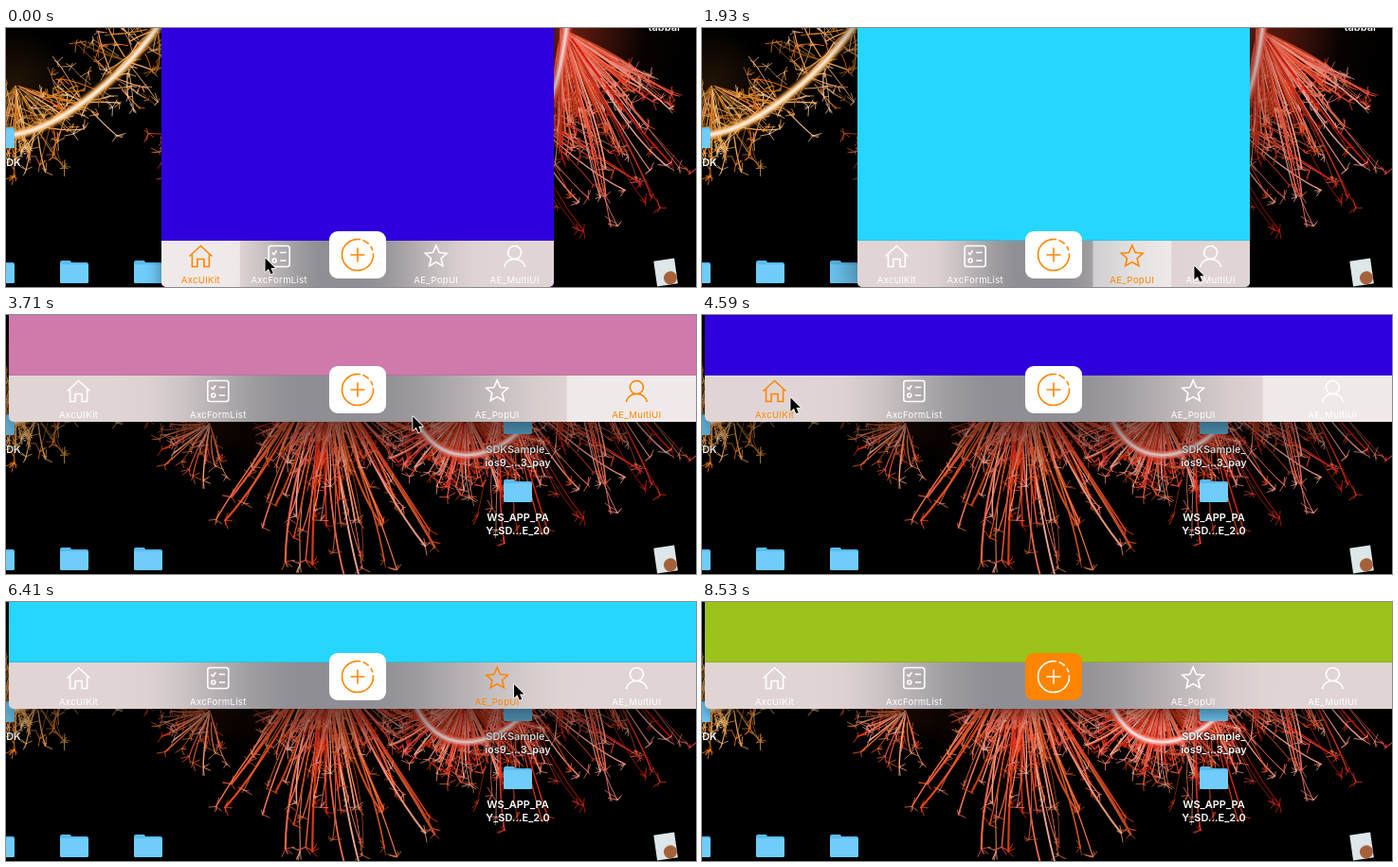
These frames come from a looping animation (728 px wide and 274 px high, 8.63 s). An HTML page with a canvas:

```html
<!DOCTYPE html>
<html lang="en">
<head>
<meta charset="utf-8">
<title>Tab bar demo</title>
<style>
html, body { margin: 0; width: 100%; height: 100%; overflow: hidden; background: #000; }
canvas { display: block; }
</style>
</head>
<body>
<canvas id="stage" width="728" height="274"></canvas>
<script>
const W = 728, H = 274, LOOP = 8630, TAU = Math.PI * 2;
const ORANGE = '#ff8500', WHITE = '#fff', GOLD = 29, CORAL = 8;
const stage = document.getElementById('stage').getContext('2d');

const TABS = [
  { label: 'AxcUIKit', page: '#2f00dd', icon: home },
  { label: 'AxcFormList', page: '#404633', icon: list },
  { label: '', page: '#9bc31b', icon: plus },
  { label: 'AE_PopUI', page: '#26d6ff', icon: star },
  { label: 'AE_MultiUI', page: '#ce7bac', icon: person }
];
// The pointer is at x, y when the tab is chosen, then leaves for the next stop
const STOPS = [
  { at: 0, tab: 0, x: 273, y: 243 },
  { at: 350, tab: 1, x: 275, y: 245 },
  { at: 1060, tab: 2, x: 383, y: 250 },
  { at: 1700, tab: 3, x: 456, y: 253 },
  { at: 2280, tab: 4, x: 530, y: 251 },
  { at: 3110, tab: 4, x: 500, y: 250 },
  { at: 3710, tab: 4, x: 430, y: 107 },
  { at: 4590, tab: 0, x: 92, y: 87 },
  { at: 5060, tab: 1, x: 235, y: 88 },
  { at: 5830, tab: 2, x: 425, y: 102 },
  { at: 6330, tab: 3, x: 505, y: 88 },
  { at: 7120, tab: 4, x: 610, y: 83 },
  { at: 7710, tab: 2, x: 385, y: 84 },
  { at: LOOP, tab: 0, x: 400, y: 290 }
];

const mix = (a, b, p) => a + (b - a) * p;
const progress = (t, start, end) => Math.min(1, Math.max(0, (t - start) / (end - start)));
function ease(t, start, end) {
  const p = progress(t, start, end);
  return p * p * (3 - 2 * p);
}

// ---- desktop ----
let seed = 7;
function random() {
  seed = (seed * 16807) % 2147483647;
  return seed / 2147483647;
}
const range = (a, b) => mix(a, b, random());

function line(g, points, close) {
  g.beginPath();
  points.forEach(([x, y]) => g.lineTo(x, y));
  if (close) g.closePath();
  g.stroke();
}

// Sparks around a direction (degrees), each ending in a small star
function burst(g, x, y, count, direction, spread, reach, hue, width = 1) {
  const halo = g.createRadialGradient(x, y, 0, x, y, reach * .6);
  halo.addColorStop(0, `hsl(${hue} 70% 45% / ${count / 250})`);
  halo.addColorStop(1, `hsl(${hue} 70% 45% / 0)`);
  g.fillStyle = halo;
  g.fillRect(0, 0, W, H);
  for (let i = 0; i < count; i++) {
    const a = (direction + range(-spread, spread)) * Math.PI / 180;
    const r = reach * range(.3, 1), bend = range(-.08, .08) * r;
    const c = Math.cos(a), s = Math.sin(a), from = r * range(0, .4);
    const ex = x + c * r, ey = y + s * r;
    g.strokeStyle = `hsl(${hue + range(-5, 7)} ${range(65, 95)}% ${range(38, 78)}%)`;
    g.lineWidth = range(.6, 1.7) * width;
    g.beginPath();
    g.moveTo(x + c * from, y + s * from);
    g.quadraticCurveTo(x + c * r * .7 - s * bend, y + s * r * .7 + c * bend, ex, ey);
    g.stroke();
    g.lineWidth = .8;
    for (let k = 0; k < 5; k++) {
      const b = random() * TAU, d = range(2, 10);
      line(g, [[ex, ey], [ex + Math.cos(b) * d, ey + Math.sin(b) * d]]);
    }
  }
}

function trail(g, path, hue) {
  for (let width = 14; width > 1; width -= 3) {
    g.lineWidth = width;
    g.strokeStyle = `hsl(${hue} 90% ${100 - width * 3.5}% / ${1.2 - width / 13})`;
    g.stroke(new Path2D(path));
  }
}

function folder(g, x, y) {
  g.fillStyle = '#5bbbee';
  g.beginPath();
  g.roundRect(x - 15, y - 12, 12, 6, 2);
  g.roundRect(x - 15, y - 10, 30, 8, 2);
  g.fill();
  g.fillStyle = '#70cdfb';
  g.beginPath();
  g.roundRect(x - 15, y - 8, 30, 20, 1.5);
  g.fill();
}

function caption(g, x, y, ...rows) {
  g.font = '600 11px Inter, sans-serif';
  g.textAlign = 'center';
  g.fillStyle = WHITE;
  g.shadowColor = '#000';
  g.shadowBlur = 3;
  rows.forEach((row, i) => g.fillText(row, x, y + i * 14));
  g.shadowBlur = 0;
}

function paintDesktop() {
  const canvas = document.createElement('canvas');
  canvas.width = W;
  canvas.height = H;
  const g = canvas.getContext('2d');
  g.fillRect(0, 0, W, H);
  g.lineCap = 'round';

  for (let p = 0; p <= 1; p += .1) {
    burst(g, 160 * p, 113 - 113 * p ** 1.7, 10, 90, 180, 55, GOLD, .8);
  }
  burst(g, 10, 60, 45, 75, 60, 100, GOLD, .8);
  trail(g, 'M-5 114C50 114 120 55 162-4', 32);

  burst(g, 215, 115, 40, 145, 75, 65, 14, .9);
  burst(g, 335, 55, 75, 93, 36, 230, 12, 1.3);
  burst(g, 350, 80, 90, 90, 75, 100, CORAL);
  burst(g, 485, 100, 190, 85, 90, 95, CORAL);
  burst(g, 525, 70, 50, 65, 42, 175, CORAL);
  burst(g, 585, 0, 130, 62, 34, 150, CORAL);
  burst(g, 588, 0, 30, 65, 18, 220, CORAL);
  trail(g, 'M430 105C455 165 510 155 545 120S586 40 592-4', 6);

  for (let x = -6; x < 160; x += 78) folder(g, x, 258);
  folder(g, -6, 115);
  folder(g, 540, 114);
  folder(g, 540, 186);
  caption(g, 8, 146, 'DK');
  caption(g, 695, 3, 'tabbar');
  caption(g, 540, 146, 'SDKSample_', 'ios9_…3_pay');
  caption(g, 540, 218, 'WS_APP_PA', 'Y_SD…E_2.0');

  g.translate(696, 258);
  g.rotate(-.14);
  g.fillStyle = '#dde6e8';
  g.fillRect(-11, -13, 22, 27);
  g.fillStyle = '#a5623a';
  g.beginPath();
  g.arc(4, 7, 7, 0, TAU);
  g.fill();
  return canvas;
}

// ---- icons, centred on the origin ----
function home(g) {
  line(g, [[-12, 0], [0, -11], [12, 0]]);
  line(g, [[-9, -2], [-9, 11], [-3.5, 11], [-3.5, 3], [3.5, 3], [3.5, 11], [9, 11], [9, -2]]);
}
function list(g) {
  g.beginPath();
  g.roundRect(-11, -11, 22, 22, 2.5);
  g.moveTo(-3, 4.5);
  g.arc(-5, 4.5, 2, 0, TAU);
  g.stroke();
  line(g, [[-7.5, -4], [-5.5, -2], [-2.5, -6]]);
  line(g, [[1, -4], [7.5, -4]]);
  line(g, [[1, 4.5], [7.5, 4.5]]);
}
function star(g) {
  line(g, Array.from({ length: 10 }, (_, i) => {
    const r = i % 2 ? 5.6 : 12, a = i * Math.PI / 5;
    return [Math.sin(a) * r, .5 - Math.cos(a) * r];
  }), true);
}
function person(g) {
  g.beginPath();
  g.arc(0, -4, 7, 0, TAU);
  g.moveTo(-11, 11.5);
  g.bezierCurveTo(-9, 0, 9, 0, 11, 11.5);
  g.stroke();
}
function plus(g) {
  for (const [a, b] of [[-.1, 4.9], [5.05, 5.5], [5.7, 6]]) {
    g.beginPath();
    g.arc(0, 0, 16.5, a, b);
    g.stroke();
  }
  line(g, [[-7.5, 0], [7.5, 0]]);
  line(g, [[0, -7.5], [0, 7.5]]);
}

// ---- simulator window ----
function drawBar(g, left, top, width) {
  const shade = g.createLinearGradient(left, 0, left + width, 0);
  for (let p = 0; p <= 1; p += .05) {
    const pale = 1 - ease(p, .17, .42) + ease(p, .5, .82);
    shade.addColorStop(p, `rgb(${mix(143, 224, pale)} ${mix(142, 213, pale)} ${mix(148, 212, pale)})`);
  }
  g.fillStyle = shade;
  g.fillRect(left, top, width, 49);
  g.fillStyle = 'rgba(0,0,0,.18)';
  g.fillRect(left, top - .5, width, .5);
}

function drawTab(g, tab, x, y, selected) {
  g.save();
  g.translate(x, y);
  g.strokeStyle = g.fillStyle = selected ? ORANGE : WHITE;
  g.lineWidth = 1.6;
  if (tab.icon === plus) {
    g.strokeStyle = selected ? WHITE : ORANGE;
    g.beginPath();
    g.roundRect(-30, -10, 60, 50, 9);
    g.fill();
    g.translate(0, 15);
  } else {
    g.font = '9.6px Inter, sans-serif';
    g.letterSpacing = '.3px';
    g.textAlign = 'center';
    g.fillText(tab.label, 0, 44.8);
    g.translate(0, 16.5);
  }
  tab.icon(g);
  g.restore();
}

function drawWindow(g, t) {
  const turn = ease(t, 3110, 3540);
  const w = mix(414, 736, turn), h = mix(736, 414, turn);
  const left = 371 - w / 2, bottom = -94 + h / 2;
  const bar = bottom - 49, cell = w / 5;
  const active = t >= 350 && t < 8530;
  const current = STOPS.findLastIndex(stop => stop.at <= t);
  const { at, tab: selected } = STOPS[current];
  const previous = STOPS[Math.max(0, current - 1)].tab;

  g.save();
  g.beginPath();
  g.roundRect(left, bottom - h, w, h, 5);
  g.shadowColor = active ? 'rgba(0,0,0,.6)' : 'rgba(0,0,0,.45)';
  g.shadowBlur = active ? 46 : 18;
  g.shadowOffsetY = active ? 18 : 7;
  g.fillStyle = TABS[selected].page;
  g.fill();
  g.shadowColor = 'transparent';
  g.clip();
  drawBar(g, left, bar, w);

  const fade = ease(t, at + 60, at + 220);
  TABS.forEach((tab, i) => {
    const light = i === selected && i === previous ? 1
      : i === selected ? fade : i === previous ? 1 - fade : 0;
    if (tab.icon !== plus) {
      g.fillStyle = `rgba(255,255,255,${light / 2})`;
      g.fillRect(left + i * cell, bar, cell, 49);
    }
    drawTab(g, tab, left + (i + .5) * cell, bar, i === selected);
  });
  g.restore();
}

function drawPointer(g, t) {
  const next = STOPS.findIndex(stop => stop.at > t);
  const from = STOPS[next - 1], to = STOPS[next];
  const p = 1 - (1 - progress(t, from.at, mix(from.at, to.at, .65))) ** 2;
  g.save();
  g.translate(mix(from.x, to.x, p), mix(from.y, to.y, p));
  const arrow = new Path2D('M.5 .5V15L4 11.8 6.3 17.3 8.8 16.2 6.5 10.9H11Z');
  g.lineJoin = 'round';
  g.lineWidth = 1.6;
  g.strokeStyle = WHITE;
  g.stroke(arrow);
  g.fillStyle = '#000';
  g.fill(arrow);
  g.restore();
}

const desktop = paintDesktop();
const began = performance.now();
function draw() {
  const t = (performance.now() - began) % LOOP;
  stage.drawImage(desktop, 0, 0);
  drawWindow(stage, t);
  drawPointer(stage, t);
  requestAnimationFrame(draw);
}
draw();
</script>
</body>
</html>
```
